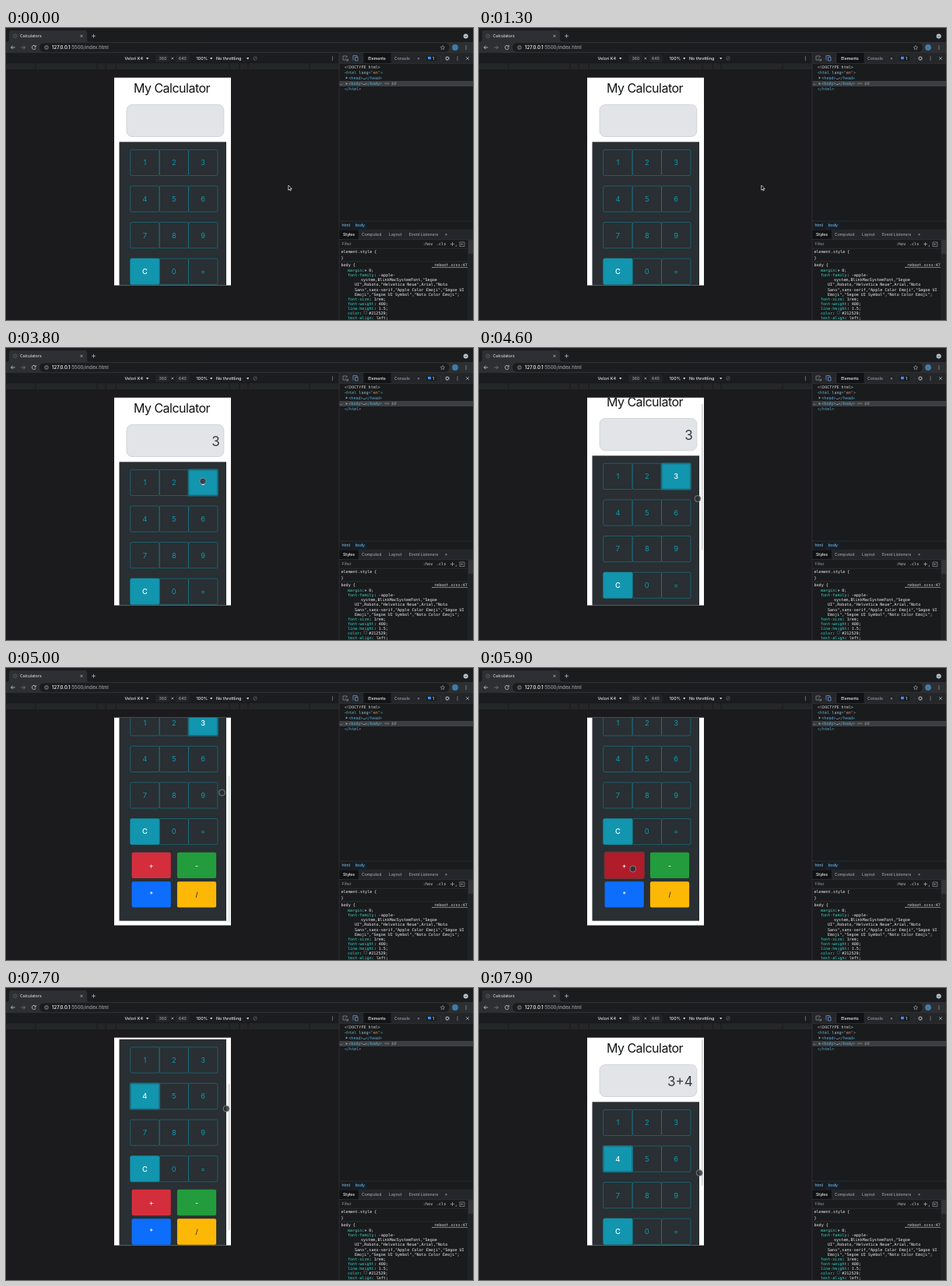
An HTML page that plays this animation: 600x375 px, repeating every 8 s.

```html
<!DOCTYPE html>
<html lang="en">
<head>
<meta charset="utf-8">
<title>Calculator demo</title>
<style>
html, body { margin: 0; width: 100%; height: 100%; overflow: hidden; background: #1b1b1d; }
svg { display: block; width: 100vw; height: 100vh; }
text { font-family: Inter, Roboto, sans-serif; white-space: pre; }
.ui { font-weight: 500; }
.mono { font-family: "DejaVu Sans Mono", monospace; }
</style>
</head>
<body>
<svg id="stage" viewBox="0 0 600 375"></svg>
<script>
const LOOP = 8000;
const TEAL = '#1295ae';
const EDGE = '#177f92';
const STRIP = '#1b1c1e', BAR = '#2e2f32', PANEL = '#1a1b1d', HEAD = '#252629', RULE = '#3c3d41';
const stage = document.getElementById('stage');

const rect = (x, y, w, h, fill, extra = '') =>
  `<rect x="${x}" y="${y}" width="${w}" height="${h}" fill="${fill}" ${extra}/>`;
const circle = (x, y, r, fill, extra = '') =>
  `<circle cx="${x}" cy="${y}" r="${r}" fill="${fill}" ${extra}/>`;
const line = (d, color, w = 0.7) =>
  `<path d="${d}" fill="none" stroke="${color}" stroke-width="${w}"/>`;
const shape = (d, fill) => `<path d="${d}" fill="${fill}"/>`;
const text = (x, y, size, fill, str, extra = '') =>
  `<text x="${x}" y="${y}" font-size="${size}" fill="${fill}" ${extra}>${str}</text>`;
const ui = (x, y, size, fill, str) => text(x, y, size, fill, str, 'class="ui"');
const code = (x, y, str, fill = '#f0f0f0', extra = '') =>
  text(x, y, 5.08, fill, str, 'class="mono" ' + extra);
const span = (fill, str) => `<tspan fill="${fill}">${str}</tspan>`;
const caret = (x, y) => shape(`M${x} ${y}h3.4l-1.7 2.4z`, '#d4d5d8');
const wedge = (x, y) => shape(`M${x} ${y}l2.4 1.6l-2.4 1.6z`, '#9aa0a6');
const dots = (x, y) => [-2, 0, 2].map(d => circle(x, y + d, 0.6, '#c4c5c8')).join('');
const cross = (x, y, r, color) =>
  line(`M${x - r} ${y - r}l${2 * r} ${2 * r}m0 ${-2 * r}l${-2 * r} ${2 * r}`, color);

function browser() {
  const grey = '#c4c5c8';
  return rect(0, 0, 600, 18, STRIP) +
    shape('M0 18q4 0 4-3V6q0-3 3-3h94q3 0 3 3v9q0 3 4 3z', BAR) +
    circle(11.5, 10.3, 2.5, '#3b3c40', 'stroke="#66686c" stroke-width=".5"') +
    ui(18, 12.4, 5.1, '#d5d6d9', 'Calculatorx') + cross(97, 10.3, 1.5, grey) +
    line('M110 10.3h5m-2.5-2.5v5', grey) +
    circle(590.7, 10.5, 3, grey) + line('M589.4 10l1.3 1.3l1.3-1.3', STRIP) +
    rect(0, 18, 600, 14, BAR) + rect(43, 19.3, 527, 11.4, STRIP, 'rx="5.7"') +
    line('M11.5 25h-5m2.2-2.3l-2.3 2.3l2.3 2.3', '#e0e1e4') +
    line('M19.5 25h5m-2.2-2.3l2.3 2.3l-2.3 2.3', '#84868a') +
    line('M38 23.6a2.5 2.5 0 1 0 .3 2M38.3 22.2v1.9h-2', '#e0e1e4') +
    circle(52, 25, 2.3, 'none', `stroke="${grey}" stroke-width=".6"`) +
    line('M52 24.7v1.6m0-2.7v.6', grey, 0.6) +
    ui(59, 27.1, 6.05, '#f4f4f5', '127.0.0.1' + span('#9a9ca1', ':5500/index.html')) +
    line('M561 22.5l.8 1.7l1.9.2l-1.4 1.3l.4 1.9l-1.7-1l-1.7 1l.4-1.9l-1.4-1.3l1.9-.2z', grey, 0.5) +
    circle(577, 25, 3.9, '#3d7cab') + dots(591, 25);
}

function deviceBar() {
  const t = (x, s) => ui(x, 41, 5.45, '#e4e5e8', s);
  const edges = [38, 117, 128, 141];
  return rect(0, 32, 428, 13, STRIP) +
    t(152.5, 'Velori K4') + caret(180, 38) +
    rect(192, 34.3, 17.5, 9.4, '#232426', 'rx="1"') + rect(218, 34.3, 17.5, 9.4, '#232426', 'rx="1"') +
    ui(196.5, 41, 5.1, '#a0a2a6', '360') + cross(213.8, 39, 1.4, '#c4c5c8') +
    ui(222, 41, 5.1, '#a0a2a6', '640') +
    t(244.5, '100%') + caret(262, 38) + t(270, 'No throttling') + caret(309, 38) +
    circle(320, 39, 2.3, 'none', 'stroke="#66686c" stroke-width=".6"') + line('M318 41l4-4', '#66686c', 0.6) +
    dots(419.5, 39) +
    rect(0, 45, 428, 8.6, '#252628') +
    edges.map(x => line(`M${x} 45v8.6M${428 - x} 45v8.6`, '#17171a', 0.8)).join('') +
    line('M0 45h428M0 53.6h428', '#17171a', 0.5);
}

function devtools() {
  const tab = (x, y, s, fill = '#9aa0a6') => ui(x, y, 5.1, fill, s);
  const tag = s => span('#5db0d7', s);
  const prop = (y, name, value) =>
    code(439, y, span('#35d4c7', name) + ': ' + value);
  const lines = [
    [456, 'system,BlinkMacSystemFont,"Segoe'],
    [448, 'UI",Roboto,"Helvetica Neue",Arial,"Noto'],
    [448, 'Sans",sans-serif,"Apple Color Emoji","Segoe UI'],
    [448, 'Emoji","Segoe UI Symbol","Noto Color Emoji";']
  ];
  return rect(428, 32, 172, 343, PANEL) + rect(428, 32, 172, 13.5, HEAD) +
    rect(459.5, 32, 35, 13.5, '#111214') +
    line('M428 32v343', RULE, 0.6) + line('M428 45.5h172', RULE, 0.5) +
    line('M437 41h-4v-5h5v2M436 38.5l3.5 3.5m0-2.5v2.5h-2.5', '#a5a9ae', 0.6) +
    line('M446 41.5v-6h5v2M448.5 37.5h3.5v4.5h-3.5z', '#6ea5e8', 0.7) +
    line('M458 35v8', RULE, 0.5) +
    tab(465.3, 40.9, 'Elements', '#f6f6f7') +
    tab(499, 40.9, 'Console') + tab(528.5, 40.9, '»') +
    rect(539.5, 34.8, 14.5, 8, STRIP, `rx="1" stroke="${RULE}" stroke-width=".4"`) +
    rect(542, 36.8, 4, 3.5, '#3f8cf4', 'rx=".6"') + tab(548, 40.9, '1', '#c4d8f4') +
    line('M559 35v8', RULE, 0.5) +
    circle(567, 39, 2, 'none', 'stroke="#a5a9ae" stroke-width="1.4" stroke-dasharray="1.1 .47"') +
    circle(567, 39, 1.7, 'none', 'stroke="#a5a9ae" stroke-width=".6"') +
    dots(580, 39) + cross(593, 39, 1.8, '#c4c5c8') +

    rect(428.3, 68, 171.7, 7, '#3d3e41') +
    code(435, 52, '&lt;!DOCTYPE html&gt;', '#d0d0d0') +
    code(435, 59, tag('&lt;html ') + span('#9bbbdc', 'lang') + tag('="') + span('#f29766', 'en') + tag('"&gt;')) +
    wedge(436.7, 62.4) + code(440.3, 66, tag('&lt;head&gt;') + '…' + tag('&lt;/head&gt;')) +
    code(429.3, 72.6, '…', '#a5a9ae') + wedge(436.7, 69.9) +
    code(440.3, 73.2, tag('&lt;body&gt;') + '…' + tag('&lt;/body&gt;') + span('#9aa0a6', ' == <tspan font-style="italic">$0</tspan>')) +
    code(435, 80.2, tag('&lt;/html&gt;')) +

    line('M428 248h172M428 259.3h172', RULE, 0.5) +
    rect(445.5, 248.4, 19, 10.7, '#16202a') +
    tab(431.5, 255.4, 'html', '#6fb4de') + tab(448.7, 255.4, 'body', '#6fb4de') +
    rect(428.3, 259.5, 171.7, 12, HEAD) + rect(428.3, 259.5, 24.5, 12, '#111214') +
    line('M428 271.6h172M428 283.3h172', RULE, 0.5) +
    tab(433, 267.2, 'Styles', '#f6f6f7') +
    tab(457, 267.2, 'Computed') + tab(492, 267.2, 'Layout') +
    tab(517.8, 267.2, 'Event Listeners') + tab(564, 267.2, '»') +
    tab(431.5, 279.4, 'Filter', '#85888d') +
    code(536, 279.3, ':hov', '#d4d5d8') + code(553, 279.3, '.cls', '#d4d5d8') +
    line('M571 277.5h5m-2.5-2.5v5', '#c4c5c8', 0.6) + shape('M577 280.5h2v-2z', '#85888d') +
    line('M583 275h6v5.5h-6zM587.5 277.7h-3m1.2-1.2l-1.2 1.2l1.2 1.2', '#a5a9ae', 0.6) +

    rect(593, 271.8, 7, 104, '#212224') + rect(594, 272.2, 6, 18, '#343538') +
    code(430.5, 289.3, 'element.style {') + code(430.5, 297, '}') +
    line('M428 300h165', RULE, 0.5) +
    code(430.5, 306, 'body {') + code(547, 306, '_reboot.scss:47', '#e0e0e2', 'text-decoration="underline"') +
    code(439, 313.2, span('#35d4c7', 'margin') + ':') + wedge(461.3, 309.8) + code(466.2, 313.2, '0;') +
    prop(319.4, 'font-family', '-apple-') +
    lines.map(([x, s], i) => code(x, 325.4 + 6.05 * i, s)).join('') +
    prop(349.6, 'font-size', '1rem;') + prop(355.6, 'font-weight', '400;') + prop(361.7, 'line-height', '1.5;') +
    code(439, 367.8, span('#35d4c7', 'color') + ':') +
    rect(460, 363.7, 3.8, 3.8, '#212529', 'stroke="#66686c" stroke-width=".4"') +
    code(466.2, 367.8, '#212529;') + prop(374, 'text-align', 'left;');
}

function key(label, i) {
  const x = 159.7 + 37.4 * (i % 3), y = 156.3 + 46.6 * Math.floor(i / 3);
  const on = label === 'C';
  return `<g id="key${i}">` +
    rect(x, y, 37.4, 33.2, on ? TEAL : 'none', `rx="1.6" stroke="${on ? TEAL : EDGE}" stroke-width=".6"`) +
    text(x + 18.7, y + 20, 9.3, on ? '#fff' : TEAL, label,
      `text-anchor="middle" ${on ? 'font-weight="500"' : ''}`) + '</g>';
}

function op(label, i, fill, ink) {
  const x = 161.6 + 58.3 * (i % 2), y = 339.3 + 37.5 * Math.floor(i / 2);
  return `<g id="op${i}">` + rect(x, y, 50.2, 33.3, fill, 'rx="2"') +
    text(x + 25.1, y + 20, 8.6, ink, label, 'text-anchor="middle" font-weight="500"') + '</g>';
}

function calculator() {
  return '<clipPath id="view"><rect x="139" y="63.7" width="150" height="266.7"/></clipPath>' +
    '<g clip-path="url(#view)">' + rect(139, 63, 150, 268, '#fff') + '<g id="page">' +
    text(213, 83, 16, '#101214', 'My Calculator', 'text-anchor="middle" letter-spacing="-.5"') +
    rect(155, 98.5, 124.8, 41, '#e3e4e8', 'rx="7" stroke="#cdced3" stroke-width=".8"') +
    text(274.8, 126, 17, '#343a40', '', 'id="display" text-anchor="end"') +
    rect(145.5, 146.3, 137.5, 281, '#292f33') +
    [...'123456789C0='].map(key).join('') +
    op('+', 0, '#d42e3d', '#fff') + op('-', 1, '#229c3c', '#fff') +
    op('*', 2, '#0d6efd', '#fff') + op('/', 3, '#fdb805', '#212529') +
    '</g>' + rect(286, 66, 1.6, 188, '#8d8d8d', 'id="bar" rx=".8"') + '</g>';
}

function pointers() {
  const plus = 'M-2.8 0H2.8M0 -2.8V2.8';
  return '<g id="arrow"><path d="M0 0v6.2l1.5-1.3l1 2.1l1-.5l-1-2h1.9z" fill="#000" stroke="#fff" stroke-width=".7"/></g>' +
    '<g id="plus">' + line(plus, '#fff', 2.6) + line(plus, '#111', 1.5) + '</g>' +
    '<g id="touch">' + circle(0, 0, 4, '#2b2f33', 'fill-opacity=".85" stroke="#a5a5a5" stroke-opacity=".85" stroke-width=".8"') + '</g>';
}

stage.innerHTML = rect(0, 0, 600, 375, '#1b1b1d') + browser() + deviceBar() + devtools() + calculator() + pointers();

const $ = id => document.getElementById(id);

// [time, x, y]
const path = [
  [0, 362.8, 202], [1500, 362.8, 202], [2200, 278, 141.6], [3000, 278, 141.6],
  [3500, 253, 171], [3800, 253, 171], [4300, 281, 201.5], [4480, 281, 201.5],
  [4600, 281, 193.5], [4850, 278, 104], [5000, 277.5, 160], [5200, 277.5, 160],
  [5700, 197.7, 258], [6200, 197.7, 258], [6800, 165.5, 116], [7200, 165.5, 116],
  [7550, 283, 134], [7620, 283, 134], [7900, 283.3, 237.5], [8000, 283.3, 237.5]
];
// [time, offset]
const scrolls = [[0, 0], [4480, 0], [4600, 8], [4850, 102.6], [7620, 102.6], [7890, 0], [8000, 0]];
const fades = [[0, 0], [4480, 0], [4560, 0.4], [4850, 0.4], [5000, 0.3], [5300, 0], [7600, 0], [7680, 0.4], [8000, 0.4]];

function sample(track, t, col) {
  const i = Math.max(1, track.findIndex(k => k[0] > t));
  const a = track[i - 1], b = track[i];
  const u = (t - a[0]) / (b[0] - a[0]);
  return a[col] + (b[col] - a[col]) * u * u * (3 - 2 * u);
}

function press(id, on, fill, rest, ring) {
  const [box, label] = $(id).children;
  const isKey = id.startsWith('key');
  box.setAttribute('fill', on ? fill : rest);
  box.setAttribute('stroke', on ? ring : isKey ? EDGE : 'none');
  box.setAttribute('stroke-width', on ? 1.9 : 0.6);
  if (isKey) {
    label.setAttribute('fill', on ? '#fff' : TEAL);
    label.setAttribute('font-weight', on ? 500 : 400);
  }
}

function draw(t) {
  const x = sample(path, t, 1), y = sample(path, t, 2);
  const scroll = sample(scrolls, t, 1);
  const kind = t >= 3050 ? 'touch' : x < 289 ? 'plus' : 'arrow';
  for (const id of ['arrow', 'plus', 'touch']) {
    $(id).setAttribute('display', id === kind ? 'inline' : 'none');
    $(id).setAttribute('transform', `translate(${x} ${y})`);
  }
  $('page').setAttribute('transform', `translate(0 ${-scroll})`);
  $('bar').setAttribute('y', 66 + scroll * 0.71);
  $('bar').setAttribute('opacity', sample(fades, t, 1));
  $('display').textContent = t < 3600 ? '' : t < 5800 ? '3' : t < 6900 ? '3+' : '3+4';
  press('key2', t >= 3600 && t < 5800, TEAL, 'none', '#1a6c7c');
  press('op0', t >= 5800 && t < 6900, '#b01c29', '#d42e3d', '#7d3039');
  press('key3', t >= 6900, TEAL, 'none', '#1a6c7c');
}

function tick(now) {
  draw(now % LOOP);
  requestAnimationFrame(tick);
}
draw(0);
requestAnimationFrame(tick);
</script>
</body>
</html>
```
